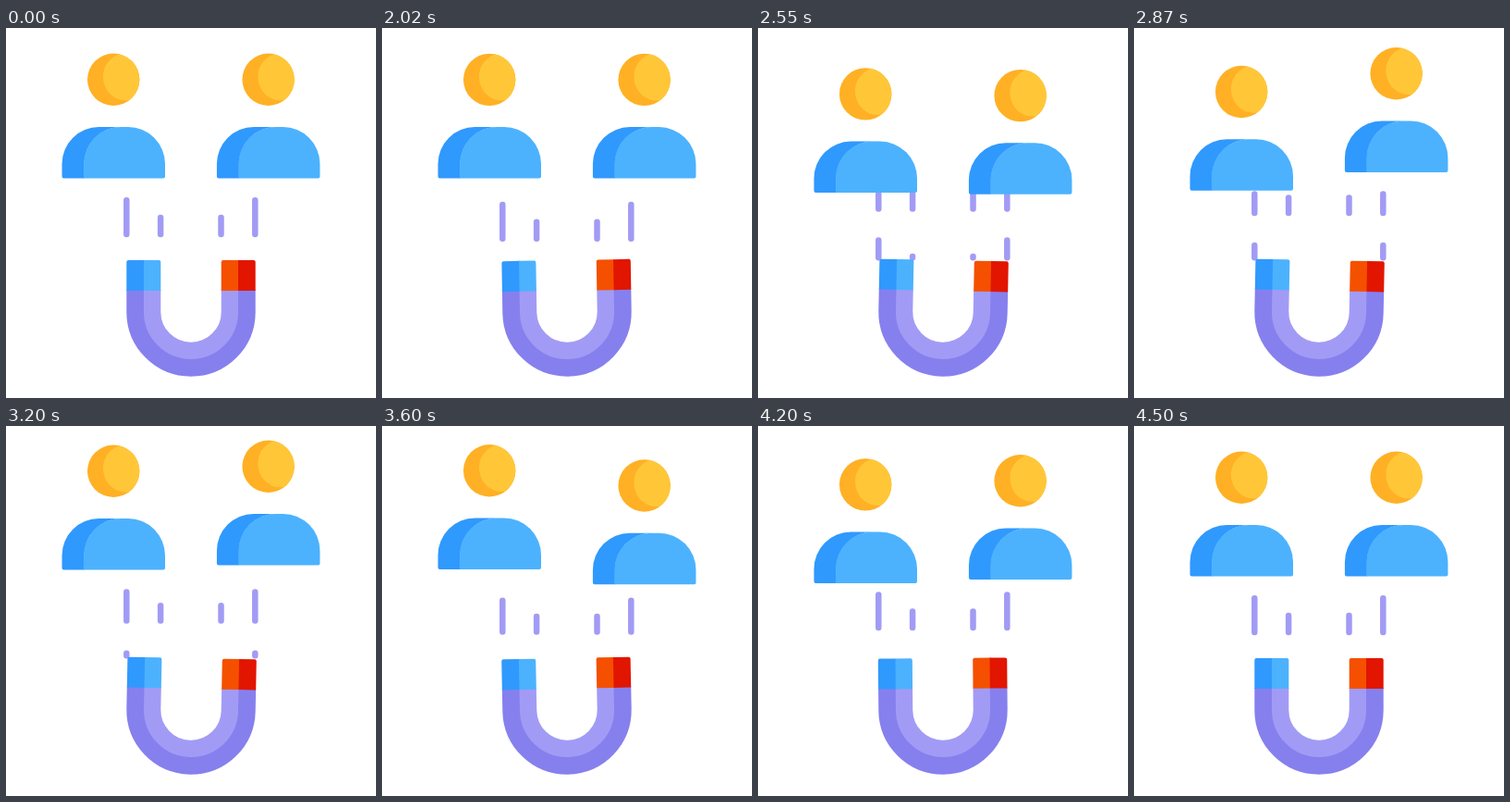
An HTML page for the animation above (4.52 s loop, 400 by 400 pixels).

```html
<!DOCTYPE html>
<html lang="en">
<head>
<meta charset="utf-8">
<title>Magnet attracting people</title>
<style>
  html, body { margin: 0; width: 100%; height: 100%; overflow: hidden; background: #fff; }
  svg { display: block; width: 100vw; height: 100vh; }
</style>
</head>
<body>
<svg viewBox="0 0 400 400">
  <defs>
    <g id="person">
      <circle cx="116.2" cy="55.8" r="28.2" fill="#ffb024"/>
      <path fill="#ffc738" d="M122 28.2C111 33 105 42 105 52C105 68 117 80 133 78.3A28.2 28.2 0 0 0 122 28.2Z"/>
      <path fill="#3099fd" d="M60.5 147A40 40 0 0 1 100.5 107H124.5A40 40 0 0 0 84.5 147V162.5H62.5Q60.5 162.5 60.5 160.5Z"/>
      <path fill="#4cb2fe" d="M84 162.5V147A40 40 0 0 1 124 107H132A40 40 0 0 1 172 147V160.5Q172 162.5 170 162.5Z"/>
    </g>
  </defs>
  <g id="lines" fill="none" stroke="#a29bf5" stroke-width="6.5" stroke-linecap="round"></g>
  <g id="left"><use href="#person"/></g>
  <g id="right"><use href="#person" x="167.4"/></g>
  <g id="magnet">
    <g fill="none">
      <path stroke="#8680ee" stroke-width="19.7" d="M140.15 283V307A59.85 59.85 0 0 0 259.85 307V283"/>
      <path stroke="#a29bf5" stroke-width="18.3" d="M158.15 283V307A41.85 41.85 0 0 0 241.85 307V283"/>
    </g>
    <path fill="#3099fd" d="M150 251H132.3Q130.3 251 130.3 253V284H150Z"/>
    <path fill="#4cb2fe" d="M149 251H165.3Q167.3 251 167.3 253V284H149Z"/>
    <path fill="#f45000" d="M252 251H234.7Q232.7 251 232.7 253V284H252Z"/>
    <path fill="#e21500" d="M251 251H267.7Q269.7 251 269.7 253V284H251Z"/>
  </g>
</svg>
<script>
const LOOP = 4520, START = 2020, END = 4500, STEPS = 100, CYCLES = 8;
const TOP = 179.6, BOTTOM = 248.3, REST = 223;

const $ = id => document.getElementById(id);
const { PI, sin, cos, abs } = Math;
const clamp = (v, limit) => Math.max(-limit, Math.min(limit, v));

// Bobs down and up, easing to rest on each of the given steps
function bob(n, stops) {
  const level = i => i < 0 || i >= stops.length - 1 ? 0 : 1.5 + 16 * (-1) ** i;
  const i = stops.findIndex(stop => n < stop);
  if (i < 0) return 0;
  const begin = stops[i - 1] || 0;
  const ease = (1 - cos(PI * (n - begin) / (stops[i] - begin))) / 2;
  return level(i - 1) + (level(i) - level(i - 1)) * ease;
}

const lines = [69.5, 32.7, -32.7, -69.5].map(offset => {
  const path = document.createElementNS('http://www.w3.org/2000/svg', 'path');
  $('lines').append(path);
  return { x: 199.8 - offset, length: abs(offset) > 50 ? 36.8 : 18, path };
});

// A stroke running down its rail, wrapping from bottom to top
function drawLine({ x, length, path }, turns, scale) {
  const rail = BOTTOM - TOP;
  const end = (REST - TOP + turns * rail) % rail;
  const start = end - length * scale;
  const seg = (a, b) => `M${x} ${a}V${b}`;
  path.setAttribute('d', start >= 0
    ? seg(TOP + start, TOP + end)
    : seg(TOP, TOP + end) + seg(BOTTOM + start, BOTTOM));
}

function draw(now) {
  const t = now % LOOP;
  const moving = t >= START && t < END;
  const n = moving ? Math.floor((t - START) / 25) + 1 : 0;
  const p = n / STEPS;

  $('left').setAttribute('transform', `translate(0 ${bob(n, [28, 57.5, 78.5, 96])})`);
  $('right').setAttribute('transform', `translate(0 ${bob(n, [21, 42, 76, 93])})`);

  const tilt = clamp(-2 * sin(2 * PI * CYCLES * p), 1.15);
  $('magnet').setAttribute('transform', `rotate(${tilt} 200 307)`);

  const turns = CYCLES * p - .165 * abs(sin(2 * PI * p));
  const scale = 1 - .09 * sin(PI * p);
  lines.forEach(line => drawLine(line, turns, scale));
}

function tick() {
  draw(performance.now());
  requestAnimationFrame(tick);
}
tick();
</script>
</body>
</html>
```
